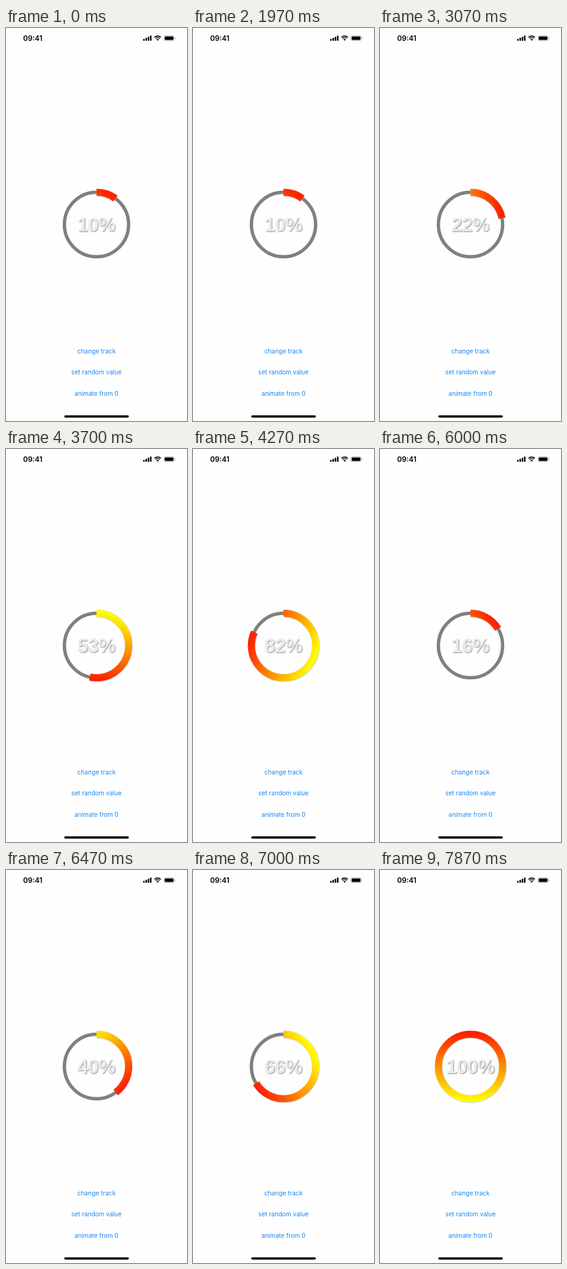
Animation of 296 by 640 pixels, one loop 8 s. Source, as an HTML page with a canvas:

```html
<!DOCTYPE html>
<html lang="en">
<head>
<meta charset="utf-8">
<title>Progress ring</title>
<style>
  html, body { margin: 0; width: 100%; height: 100%; overflow: hidden; background: #fefefe; }
  canvas { display: block; width: 296px; height: 640px; }
</style>
</head>
<body>
<canvas id="stage"></canvas>
<script>
const W = 296, H = 640, LOOP = 8000;
const CX = 148, CY = 320, RADIUS = 52.5;
const FILL_TIME = 2000, START_VALUE = 0.1;
const UI_FONT = 'Inter, "Open Sans", sans-serif';
const RUNS = [
  { press: 2390, start: 2634 },
  { press: 5190, start: 5674 }
];

const canvas = document.getElementById('stage');
const ctx = canvas.getContext('2d');
const ratio = window.devicePixelRatio || 1;
canvas.width = W * ratio;
canvas.height = H * ratio;

const clamp = v => Math.max(0, Math.min(1, v));

function valueAt(t) {
  let value = START_VALUE;
  for (const run of RUNS) {
    if (t >= run.start) value = clamp((t - run.start) / FILL_TIME);
  }
  return value;
}

function buttonAlpha(t) {
  let alpha = 1;
  for (const run of RUNS) {
    const down = clamp((t - run.press) / 100);
    const up = clamp((t - run.start) / 350);
    alpha -= 0.83 * (down - up);
  }
  return alpha;
}

function text(str, x, y, font, color, align = 'center') {
  ctx.font = font;
  ctx.textAlign = align;
  ctx.fillStyle = color;
  ctx.fillText(str, x, y);
}

function shadow(color, blur, offset) {
  ctx.shadowColor = color;
  ctx.shadowBlur = blur * ratio;
  ctx.shadowOffsetX = ctx.shadowOffsetY = offset * ratio;
}

function arc(x, y, r, from, to, width, color) {
  ctx.beginPath();
  ctx.arc(x, y, r, from, to);
  ctx.lineWidth = width;
  ctx.strokeStyle = color;
  ctx.stroke();
}

function box(x, y, w, h, r, color) {
  ctx.beginPath();
  ctx.roundRect(x, y, w, h, r);
  ctx.fillStyle = color;
  ctx.fill();
}

function drawStatusBar() {
  text('09:41', 28, 21, '600 11.8px ' + UI_FONT, '#000', 'left');

  [3.1, 4.7, 6.6, 8.5].forEach((h, i) => box(224.4 + i * 3.7, 20.8 - h, 2.4, h, 0.6, '#000'));

  const up = -Math.PI / 2, spread = 0.78;
  arc(248, 20.6, 7.5, up - spread, up + spread, 1.7, '#000');
  arc(248, 20.6, 4.8, up - spread, up + spread, 1.6, '#000');
  ctx.beginPath();
  ctx.moveTo(248, 20.8);
  ctx.arc(248, 20.6, 2.7, up - spread, up + spread);
  ctx.fillStyle = '#000';
  ctx.fill();

  ctx.beginPath();
  ctx.roundRect(258.4, 12.5, 16.6, 8.2, 2.3);
  ctx.lineWidth = 0.8;
  ctx.strokeStyle = '#a6a6a6';
  ctx.stroke();
  box(259.6, 13.7, 14.2, 5.8, 1.2, '#000');
  box(275.9, 15.2, 1, 2.9, 0.5, '#a6a6a6');
}

// The gradient axis turns so that red always sits at the arc's leading end.
function drawRing(value) {
  const top = -Math.PI / 2;
  const end = top + value * Math.PI * 2;
  arc(CX, CY, RADIUS, 0, Math.PI * 2, 5.5, '#808080');
  if (value <= 0) return;

  const dx = Math.cos(end) * 54, dy = Math.sin(end) * 54;
  const paint = ctx.createLinearGradient(CX - dx, CY - dy, CX + dx, CY + dy);
  paint.addColorStop(0, '#fffb00');
  paint.addColorStop(1, '#ff2000');
  ctx.save();
  shadow('rgba(130, 140, 160, 0.6)', 2, 0.6);
  arc(CX, CY, RADIUS, top, end, 11.5, paint);
  ctx.restore();
}

function drawLabel(value) {
  ctx.save();
  shadow('rgba(110, 110, 118, 0.8)', 1.6, 0.9);
  text(Math.round(value * 100) + '%', CX, 331,
    'bold 31px "Liberation Sans", Arial, sans-serif', '#ebebee');
  ctx.restore();
}

function drawButtons(alpha) {
  const font = '400 10.1px ' + UI_FONT, blue = '#1787f5';
  text('change track', CX, 529.6, font, blue);
  text('set random value', CX, 564.4, font, blue);
  ctx.globalAlpha = alpha;
  text('animate from 0', CX, 598.8, font, blue);
  ctx.globalAlpha = 1;
}

function draw(t) {
  const value = valueAt(t);
  ctx.setTransform(ratio, 0, 0, ratio, 0, 0);
  ctx.fillStyle = '#fefefe';
  ctx.fillRect(0, 0, W, H);
  drawStatusBar();
  drawRing(value);
  drawLabel(value);
  drawButtons(buttonAlpha(t));
  box(95.3, 630.8, 105.6, 3.6, 1.8, '#000');
}

let origin = null;
function tick(now) {
  if (origin === null) origin = now;
  draw((now - origin) % LOOP);
  requestAnimationFrame(tick);
}
draw(0);
requestAnimationFrame(tick);
</script>
</body>
</html>
```
